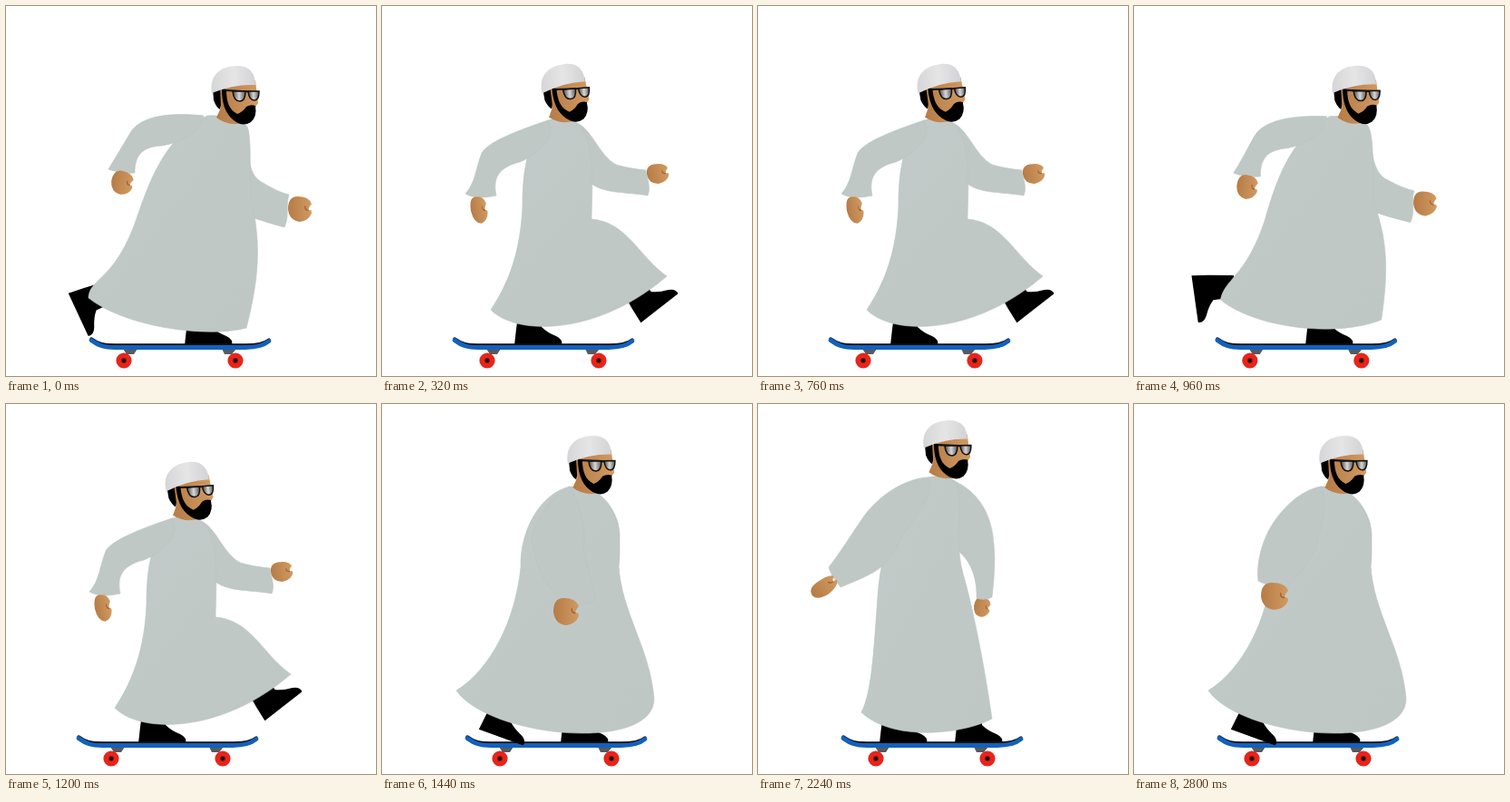
An HTML page that plays this animation: 408 by 408 pixels, repeating every 2840 ms.

```html
<!DOCTYPE html>
<html lang="en">
<head>
<meta charset="utf-8">
<title>Skateboarder</title>
<style>
html, body { margin: 0; height: 100%; overflow: hidden; background: #fff; }
svg { display: block; width: 100vw; height: 100vh; }
.cloth { fill: #c0c8c6; stroke: #bac3c1; stroke-width: .6; }
</style>
</head>
<body>
<svg viewBox="0 0 408 408">
  <defs>
    <linearGradient id="skin"><stop stop-color="#b67b46"/><stop offset="1" stop-color="#d19a62"/></linearGradient>
    <linearGradient id="cap"><stop stop-color="#d6d6d8"/><stop offset=".5" stop-color="#e5e5e6"/><stop offset="1" stop-color="#d3d3d5"/></linearGradient>
    <linearGradient id="lens"><stop stop-color="#444"/><stop offset=".5" stop-color="#d8d8d8"/><stop offset="1" stop-color="#555"/></linearGradient>
    <linearGradient id="cloth" x2="1" y2="1"><stop stop-color="#c3cac9"/><stop offset="1" stop-color="#bec7c4"/></linearGradient>
    <path id="shoe" d="M-26 8L-24 -10L-20 -38H4V-12Q10 -6 20 -2Q28 2 26 8Z"/>
    <g id="hand">
      <path d="M-1 0Q-1 -1 -.2 -1Q.8 -1 1 -.4Q.7 -.1 .75 .1Q1 0 1 .3Q.8 .9 0 1Q-.9 .9 -1 0Z" fill="url(#skin)"/>
      <path d="M.75 .1Q.4 .1 .45 -.25" fill="none" stroke="#9a6334" stroke-width=".1"/>
    </g>
    <g id="wheel">
      <circle r="8.6" fill="#e8241b"/>
      <circle r="3" fill="#7a1914"/>
      <circle r="1.9" fill="#111"/>
    </g>
  </defs>

  <g id="frontHand"><use href="#hand"/></g>
  <path id="front" class="cloth"/>
  <g id="stand"><use href="#shoe"/></g>
  <g id="board">
    <path d="M129 378h16l-4 6h-8ZM238 378h16l-5 6h-8Z" fill="#555b60"/>
    <use href="#wheel" x="130" y="391"/><use href="#wheel" x="253" y="391"/>
    <g fill="none" stroke-linecap="round">
      <path d="M94 367C102 373 108 374 120 374H264C276 374 284 373 290 368" stroke="#111" stroke-width="3.500"/>
      <path d="M94 368.500C102 374.500 108 376.500 120 376.500H264C276 376.500 284 374.500 290 369.500" stroke="#1261bd" stroke-width="4.800"/>
    </g>
  </g>
  <g id="push"><use href="#shoe"/></g>
  <path id="robe" style="fill:url(#cloth)" class="cloth"/>
  <path id="back" class="cloth"/>
  <g id="backHand"><use href="#hand"/></g>
  <g id="head">
    <path d="M-25 -9L-24 4Q-21 12 -17 14L-12 -8Z"/>
    <path d="M-17 -14L-16 12L-21 23Q-8 33 8 29L20 14L25 7L22 -18Z" fill="url(#skin)"/>
    <path d="M-15 -9L-10 -8C-10 6 -7 14 2 19Q8 17 12 11Q17 8 22 10Q24 22 17 28Q8 34 -2 26C-12 18 -15 6 -15 -9Z"/>
    <path d="M-26 -4C-29 -22 -18 -34 2 -34C16 -34 22 -26 22 -13Q-2 -14 -26 -4Z" fill="url(#cap)"/>
    <path d="M-11 -7L26 -5" stroke="#111" stroke-width="2.200"/>
    <g fill="url(#lens)" stroke="#111" stroke-width="1.500">
      <path d="M-3 -6H11Q11 5 5 5Q-2 5 -3 -6Z"/>
      <path d="M14 -6H26Q26 4 21 4Q15 4 14 -6Z"/>
    </g>
  </g>
</svg>
<script>
const LOOP = 2840, STEP = 40, CYCLE = 440, CRUISE = 1320;

const kick = {
  robe: 'M222 121C236 120 260 124 266 133C272 148 267 190 271 215C279 255 282 290 265 355C220 367 130 353 91 322C92 300 118 304 142 240C156 200 172 146 222 121Z',
  back: 'M218 121C190 118 150 118 137 140C128 155 122 165 113 180C122 183 132 185 142 184C142 165 150 155 172 154C195 150 215 140 218 121Z',
  front: 'M262 130C271 150 262 180 280 193C290 199 300 205 312 208C308 220 313 232 307 244C285 238 255 230 240 214C220 190 222 140 262 130Z',
  head: 'translate(253 100) rotate(0)',
  backHand: 'translate(128 195) rotate(10) scale(12 13)',
  frontHand: 'translate(324 224) rotate(0) scale(13 14)',
  stand: 'translate(223 366) rotate(0)',
  push: 'translate(87 337) rotate(65)',
  board: 'translate(0 0)'
};
const reach = {
  robe: 'M183 126C195 122 212 125 217 130C235 150 232 190 231 235C270 238 282 275 314 298C240 362 150 365 120 335C140 305 153 270 155 220C155 180 160 150 183 126Z',
  back: 'M183 126C160 134 118 148 110 162C103 180 103 195 92 207C100 212 112 212 126 209C122 190 128 178 152 172C170 165 195 145 183 126Z',
  front: 'M217 130C232 138 240 165 258 175C268 178 280 180 291 181C292 190 297 200 293 209C270 205 245 207 231 196C215 175 200 145 217 130Z',
  head: 'translate(203 98) rotate(-5)',
  backHand: 'translate(107 225) rotate(-10) scale(9 15)',
  frontHand: 'translate(304 185) rotate(-10) scale(12 11)',
  stand: 'translate(172 366) rotate(0)',
  push: 'translate(301 327) rotate(-38)',
  board: 'translate(-14 0)'
};
const crouchBack = {
  robe: 'M207 91C215 91 228 93 238 99C258 112 264 140 261 178C264 230 296 270 300 325C300 385 118 368 82 316C119 293 147 240 153 180C152 140 174 99 207 91Z',
  back: 'M207 91C182 94 156 122 146 145C139 160 135 180 137 195C142 199 155 200 168 203C180 190 190 180 200 160C205 140 215 110 207 91Z',
  front: 'M238 99C255 112 263 130 262 150C262 160 262 168 261 178C252 182 245 182 238 180C232 165 230 150 226 140C220 125 225 105 238 99Z',
  head: 'translate(231 69) rotate(-1)',
  backHand: 'translate(155 212) rotate(0) scale(15 15)',
  frontHand: 'translate(247 165) rotate(0) scale(8 8)',
  stand: 'translate(223 366) rotate(0)',
  push: 'translate(134 360) rotate(20)',
  board: 'translate(0 0)'
};
const crouchFront = {
  ...crouchBack,
  back: 'M207 91C185 102 168 130 165 150C170 180 180 205 205 218C215 222 225 222 235 218C235 200 225 180 222 160C225 140 220 110 207 91Z',
  backHand: 'translate(203 229) rotate(0) scale(14 15)'
};
const upright = {
  robe: 'M187 81C195 79 212 79 217 85C230 100 214 140 226 187C236 220 250 290 258 347C230 363 150 374 114 340C127 315 128 260 133 200C140 140 165 100 187 81Z',
  back: 'M187 81C165 82 135 98 116 125C102 145 90 165 78 180C80 188 86 195 91 202C118 191 138 184 150 163C165 130 200 100 187 81Z',
  front: 'M217 85C242 97 258 120 260 155C262 175 260 195 258 213C252 216 246 216 241 214C242 195 236 175 222 163C205 140 205 100 217 85Z',
  head: 'translate(209 52) rotate(-1)',
  backHand: 'translate(73 202) rotate(-36) scale(16 9)',
  frontHand: 'translate(247 224) rotate(10) scale(9 11)',
  stand: 'translate(243 366) rotate(0)',
  push: 'translate(160 366) rotate(0)',
  board: 'translate(0 0)'
};

// Blend every number in two strings of the same structure.
function mix(a, b, k) {
  const NUM = /-?\d+(\.\d+)?/g, to = String(b).match(NUM);
  let i = 0;
  return String(a).replace(NUM, n => (+n + (to[i++] - n) * k).toFixed(3));
}
const blend = (a, b, k) =>
  Object.fromEntries(Object.keys(a).map(part => [part, mix(a[part], b[part], k)]));

// Eased value of a list of [time, value] keys.
function track(keys, t) {
  const i = Math.max(1, keys.findIndex(key => key[0] > t));
  const [t0, a] = keys[i - 1], [t1, b] = keys[i];
  const k = (t - t0) / (t1 - t0);
  return mix(a, b, k * k * (3 - 2 * k));
}

const reachKeys = [[0, 0], [320, 1], [400, 0], [441, 0]];
const footKeys = [
  [0, kick.push],
  [80, 'translate(75 322) rotate(82)'],
  [200, 'translate(185 372) rotate(10)'],
  [320, reach.push],
  [360, 'translate(190 395) rotate(0)'],
  [400, 'translate(104 364) rotate(42)'],
  [440, kick.push]
];
const riseKeys = [[1320, 0], [1440, 0], [1620, 1.08], [1720, 1], [1980, 0.95], [2240, 1], [2300, 1.03], [2540, -0.05], [2800, 0], [2841, 0]];
const swingKeys = [[1320, 1.5], [1440, 1], [1620, 0], [2300, 0], [2540, -0.2], [2800, 0], [2841, 0.1]];

function poseAt(t) {
  if (t < CRUISE) {
    const phase = t % CYCLE;
    return { ...blend(kick, reach, track(reachKeys, phase)), push: track(footKeys, phase) };
  }
  const crouch = blend(crouchBack, crouchFront, track(swingKeys, t));
  return blend(crouch, upright, track(riseKeys, t));
}

function draw(now) {
  const t = Math.floor((now % LOOP) / STEP) * STEP;
  for (const [id, value] of Object.entries(poseAt(t))) {
    const el = document.getElementById(id);
    el.setAttribute(el.tagName === 'path' ? 'd' : 'transform', value);
  }
}

const start = performance.now();
function tick() {
  draw(performance.now() - start);
  requestAnimationFrame(tick);
}
tick();
</script>
</body>
</html>
```
